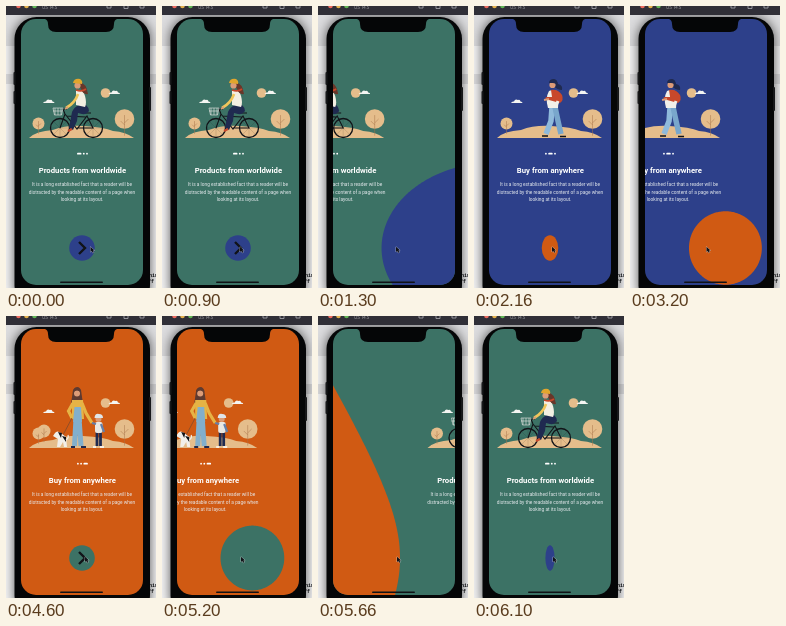
Recreate the animation shown at these times as an HTML page with a canvas. Size 150x282 px, loop 6.13 s.

```html
<!DOCTYPE html>
<html lang="en">
<head>
<meta charset="utf-8">
<title>Onboarding</title>
<style>
html, body { margin: 0; width: 100%; height: 100%; overflow: hidden; background: #dcdcde }
canvas { display: block; width: 150px; height: 282px }
</style>
</head>
<body>
<canvas id="stage"></canvas>
<script>
const W = 150, H = 282, LOOP = 6130;
const canvas = document.getElementById('stage');
const ratio = window.devicePixelRatio || 1;
canvas.width = W * ratio;
canvas.height = H * ratio;
const ctx = canvas.getContext('2d');
ctx.scale(ratio, ratio);

const GREEN = '#3c7265', BLUE = '#2d408a', ORANGE = '#d05a13';
const COLORS = [GREEN, BLUE, ORANGE];
const SAND = '#e5bd8b', NAVY = '#1f2a50', SKIN = '#dc9c78', RED = '#c8482b', WHITE = '#fff', INK = '#111318';
const TITLES = ['Products from worldwide', 'Buy from anywhere', 'Buy from anywhere'];
const BODY = ['It is a long established fact that a reader will be',
  'distracted by the readable content of a page when', 'looking at its layout.'];

const STARTS = [1073, 3061, 5080], SLIDE = 900, FOLD = 55, UNFOLD = 330;
const CX = 76, CY = 242, R = 12.8, PAGE = 122;

// drawing helpers
function fill(d, color) {
  ctx.fillStyle = color;
  ctx.fill(new Path2D(d));
}
function line(d, color, width) {
  ctx.strokeStyle = color;
  ctx.lineWidth = width;
  ctx.stroke(new Path2D(d));
}
function oval(x, y, rx, color, ry = rx) {
  ctx.fillStyle = color;
  ctx.beginPath();
  ctx.ellipse(x, y, Math.max(rx, 0), ry, 0, 0, 7);
  ctx.fill();
}
function box(x, y, w, h, r, color) {
  ctx.fillStyle = color;
  ctx.beginPath();
  ctx.roundRect(x, y, w, h, r);
  ctx.fill();
}
function text(str, x, y, font, color, align = 'center') {
  ctx.font = font;
  ctx.fillStyle = color;
  ctx.textAlign = align;
  ctx.fillText(str, x, y);
}

function tree(x, y, r) {
  oval(x, y, r, SAND);
  line(`M${x} ${y - r * .4}V${y + r * 1.7}M${x} ${y + r * .4}l${r * .4} ${-r * .4}M${x} ${y + r * .6}l${-r * .4} ${-r * .4}`, '#a8754a', .5);
}
function cloud(x, y) {
  fill(`M${x} ${y}q1-2 3-1.5q1-3 4-1.5q2-1 2.500 1.500q2 0 2 1.500z`, '#f4f5f2');
}
function scenery() {
  fill('M23 132Q30 125 47 124Q60 119 77 120Q98 121 107 125Q120 126 128 132z', SAND);
  tree(32.5, 117.5, 6);
  tree(118.5, 113, 9.8);
  oval(99.5, 87, 4.8, SAND);
  cloud(102.500, 88);
  cloud(37, 97);
}

function cyclist() {
  for (const x of [54, 87]) {
    ctx.beginPath();
    ctx.arc(x, 122, 9.5, 0, 7);
    ctx.strokeStyle = INK;
    ctx.lineWidth = 1.3;
    ctx.stroke();
    line(`M${x - 9} 122h18M${x} 113v18M${x - 6} 116l12 12M${x + 6} 116l-12 12`, '#11131866', .3);
  }
  line('M54 122L59 108L71 123L81 110L87 122H71M60 110L80 111M59 108L57 103H61M78 107h7', INK, 1.1);
  line('M47 102h10l-1.500 7h-7zM49 102v7M52 102v7M55 102v7M47 105h9', '#e8e8e4', .6);
  fill('M73 97Q82 97 83 105Q80 110 72 107L71 115L67 124L63 122L66 106Q68 101 73 99z', NAVY);
  line('M66 123l-4 2', RED, 2);
  fill('M70 85Q77 83 79 90Q81 97 79 101L70 99z', '#f3efe2');
  line('M72 88Q69 97 60 102', '#f0c65b', 2.6);
  line('M62 101l-3 2', SKIN, 1.6);
  fill('M72 77Q80 75 82 88Q77 89 75 83z', '#68372a');
  oval(71.5, 79.5, 3.1, SKIN);
  fill('M67 77Q68 72 74 73Q77 75 76 78z', '#e1a62d');
  line('M70 84Q76 86 80 83', RED, 1.8);
}

function walker() {
  line('M78 101L77 115L72 128', '#8fbadb', 5.5);
  line('M81 101L84 115L87 128', '#79a7cc', 5.5);
  line('M74 130h-6M86 130.500h6', INK, 1.6);
  fill('M78 74Q83 72 84 78Q89 79 88 84Q83 84 80 80z', NAVY);
  oval(78.5, 79, 3.1, SKIN);
  fill('M75 77Q75 73 80 73Q84 74 83 78L79 77z', NAVY);
  fill('M75 85Q81 82 85 87L84 102H74Q71 92 75 85z', '#f2f0e9');
  fill('M77 84Q84 83 88 89Q90 94 86 97L75 94Q70 93 72 91L78 91z', RED);
  line('M75 93l-5 1', SKIN, 1.8);
  line('M84 95L82 100', '#f2f0e9', 3);
}

function family() {
  tree(38, 115, 6.5);
  line('M70 102L68.500 130M73 102L75 130', '#82afcc', 5);
  line('M69 131h-4M75 131h5', NAVY, 2);
  fill('M67 74Q71 70 75 74L77 88H65z', '#5e3a30');
  oval(71, 77.5, 3, SKIN);
  fill('M67 76Q67 71 72 71Q75 72 75 76L71 74z', '#5e3a30');
  line('M67 87L62.500 95L66 102M76 87L80 97L86 107', '#e6b345', 3.2);
  fill('M66 84H77L78 103H66z', '#e6b345');
  fill('M68.500 91H75L76 106H67z', '#82afcc');
  line('M66 102L57 119', '#53423a', .5);

  line('M91 116V130M94.500 116V130', NAVY, 2.8);
  line('M90 131h-3M94 131h4', WHITE, 1.6);
  oval(92.5, 103, 3, SKIN);
  fill('M88.500 102Q89 97 93 98Q97 98 97 102z', '#dfe5ea');
  box(89, 106, 7.5, 11, 2, '#e9e7e2');
  line('M90 108L86 107M95 108L98 116', '#647fa9', 2.2);

  fill('M49 117Q51 114 55 117L60 121L61 131H58L57 126L54 131H51L52 123L47 120z', '#f2efe9');
  fill('M52 116l4 1-1 5zM56 120l4 1v5z', INK);
  line('M60 124q3-2 2-5', '#f2efe9', 1.2);
}
const ART = [cyclist, walker, family];

function page(i, dx) {
  ctx.save();
  ctx.translate(dx, 0);
  scenery();
  ART[i]();
  let x = 71;
  for (let k = 0; k < 3; k++) {
    const w = k === i ? 4.5 : 1.8;
    box(x, 146.8, w, 1.8, .9, WHITE);
    x += w + 1.4;
  }
  text(TITLES[i], CX + .4, 167.3, 'bold 7.75px Roboto, sans-serif', WHITE);
  BODY.forEach((s, k) => text(s, CX, 180.2 + k * 7.5, '4.8px Roboto, sans-serif', '#e8ecf0'));
  ctx.restore();
}

// A disc swung about the vertical axis in perspective; k runs 0 (flat) to 1 (edge on).
function swing(k, side, color) {
  const depth = 62.6, size = R * (1 + 5 * k), angle = k * Math.PI / 2;
  const c = Math.cos(angle), s = Math.sin(angle);
  const near = s > 0 ? .9995 * depth / s : 1e9;
  ctx.beginPath();
  for (let n = 0; n < 240; n++) {
    const a = n * Math.PI / 120;
    const u = Math.min(size * (Math.cos(a) + k), near);
    const zoom = depth / (depth - u * s);
    ctx.lineTo(CX + side * u * c * zoom, CY + size * Math.sin(a) * zoom);
  }
  ctx.fillStyle = color;
  ctx.fill();
}

function button(i, since) {
  const x = Math.min((since - FOLD) / UNFOLD, 1);
  if (x < 0) {
    oval(CX, CY, R * (1 - since / FOLD), COLORS[(i + 2) % 3], R);
    return;
  }
  const w = 1 - (1 - x) ** 2;
  oval(CX, CY, R * w, COLORS[(i + 1) % 3], R);
  if (w < .75) return;
  ctx.save();
  ctx.globalAlpha = (w - .75) * 4;
  ctx.translate(CX, CY);
  ctx.scale(w, 1);
  line('M-3 -6L3 0L-3 6', INK, 2.4);
  ctx.restore();
}

function screen(t) {
  let i = 0, since = 1e4, q = -1;
  STARTS.forEach((start, k) => {
    if (t < start) return;
    i = k;
    q = (t - start) / SLIDE;
    since = t - start - SLIDE;
  });
  const next = (i + 1) % 3;
  const moving = q >= 0 && q < 1;
  const early = q < .5;
  const shown = early ? i : next;
  ctx.fillStyle = COLORS[shown];
  ctx.fillRect(14, 12, 125, 270);
  if (!moving) {
    button(shown, since);
    page(shown, 0);
  } else if (early) {
    swing(2 * q, 1, COLORS[next]);
    page(i, -2 * q * PAGE);
  } else {
    swing(2 - 2 * q, -1, COLORS[i]);
    page(next, (2 - 2 * q) * PAGE);
  }
}

function desktop() {
  ctx.fillStyle = '#dcdcde';
  ctx.fillRect(0, 0, W, H);
  ctx.fillStyle = '#f4f4f5';
  ctx.fillRect(0, 40, W, 28);
  ctx.fillRect(0, 78, W, 204);
  text('inim', 140, 271, 'bold 5px "Liberation Mono", monospace', INK, 'left');
  text('iff a', 139, 277, 'bold 5px "Liberation Mono", monospace', INK, 'left');
  ctx.save();
  ctx.shadowColor = '#000a';
  ctx.shadowBlur = 12 * ratio;
  box(8.5, 11, 135.5, 290, 22, '#050607');
  ctx.restore();
  box(7.5, 66, 2, 13, 1, '#17181a');
  box(7.5, 85, 2, 13, 1, '#17181a');
  box(143, 81, 2, 24, 1, '#17181a');
  ctx.fillStyle = '#302f37';
  ctx.fillRect(0, 0, W, 9);
  ['#ed6a5e', '#e4b04b', '#61b555'].forEach((c, k) => oval(12.5 + k * 8, 0, 2.3, c));
  text('OS 14.5', 36, 3.2, '4.3px Inter, sans-serif', '#a5a5aa', 'left');
  line('M101 0v2h4v-2M118 0v2.500h4v-2.500M134 0v2h4v-2', '#aaaab0', .8);
}

function cursor(t) {
  const k = Math.min(Math.max((t - 250) / 550, 0), 1);
  const x = t < 1900 ? 84.5 - 6.5 * k * k * (3 - 2 * k)
    : t < 2600 ? 78 : t < 4300 ? 76.5 : 79;
  const arrow = `M${x} 240.800v5.200l1.300-1.100.9 1.900 1.100-.5-.9-1.900h1.700z`;
  line(arrow, '#ffffffaa', .7);
  fill(arrow, INK);
}

function frame(now) {
  const t = now % LOOP;
  desktop();
  ctx.save();
  ctx.beginPath();
  ctx.roundRect(15, 13, 122, 266, 15);
  ctx.clip();
  screen(t);
  ctx.restore();
  fill('M39 13H111Q108 14 108 18Q108 26 100 26H50Q42 26 42 18Q42 14 39 13z', '#050607');
  box(54, 275.5, 43, 1.6, .8, '#101216');
  cursor(t);
}

const begin = performance.now();
function tick() {
  frame(performance.now() - begin);
  requestAnimationFrame(tick);
}
tick();
</script>
</body>
</html>
```
